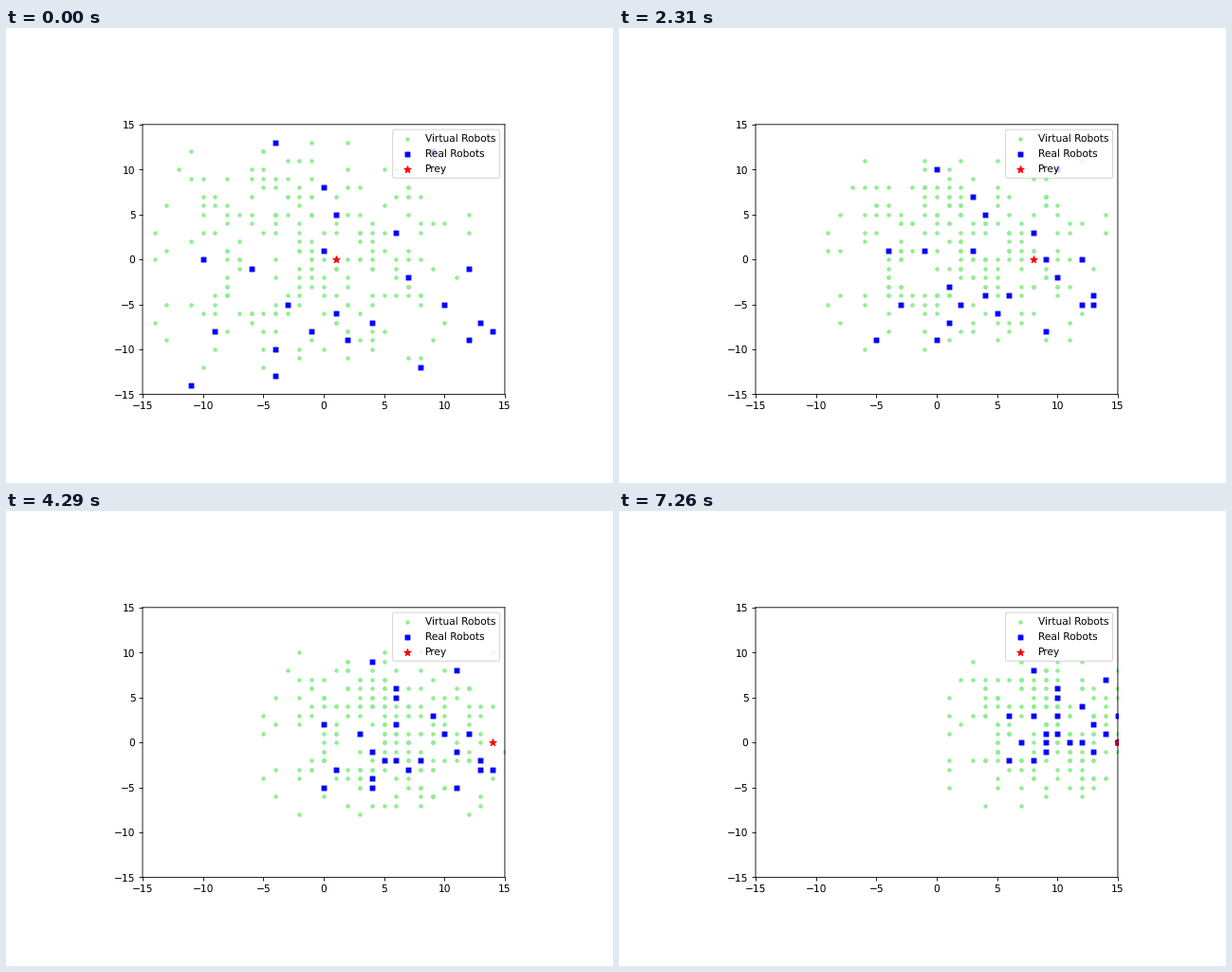
These frames come from a looping animation (640x480 px, 9250 ms). A matplotlib script:

```python
import numpy as np
import matplotlib.pyplot as plt
from matplotlib.animation import FuncAnimation

SCALE = 0.77            # the plot is drawn a little smaller than its default size
TICK_MS, STEP_MS, LOOP_MS = 50, 330, 9250
LAST = 22               # last step, held until the loop ends

plt.rcParams.update({
    "font.family": "DejaVu Sans",
    "font.size": 10 * SCALE,
    "axes.linewidth": 0.8 * SCALE,
    "patch.linewidth": SCALE,
    "lines.linewidth": 1.8 * SCALE,
    "text.hinting": "none",     # soft edges, as in a resized plot
    "path.snap": False,
})
for axis in ("xtick", "ytick"):
    for key, value in (("size", 3.5), ("width", 0.8), ("pad", 3.5)):
        plt.rcParams[f"{axis}.major.{key}"] = value * SCALE

fig = plt.figure(figsize=(6.4, 4.8), dpi=100)
ax = fig.add_axes([0.225, 0.195, 0.775 * SCALE, 0.77 * SCALE])
ax.set(xlim=(-15, 15), ylim=(-15, 15))
ax.set_xticks(range(-15, 16, 5))
ax.set_yticks(range(-15, 16, 5))


class Swarm:
    """Robots on whole cells that close in around a centre following the prey."""

    def __init__(self, starts, centers, shrink, **style):
        self.first, self.last = np.array(centers)
        self.offsets = starts - self.first
        self.shrink = np.array(shrink)
        self.dots = scatter(**style)

    def move(self, step):
        u = step / LAST
        center = self.first + (self.last - self.first) * u
        spread = self.shrink + (1 - self.shrink) * (1 - u) ** 1.5
        self.dots.set_offsets(np.rint(center + self.offsets * spread))


def scatter(color, marker, size, label):
    return ax.scatter([], [], s=size * SCALE**2, c=color, marker=marker, label=label)


def prey_at(step):
    """Run right to the wall, then dodge up and down along it."""
    return min(1 + step, 15), step % 2 if step > 14 else 0


rng = np.random.default_rng(12)
virtual = Swarm(rng.triangular((-15, -14.5), (-1, -0.5), (13.5, 14.5), (210, 2)),
                centers=[(-1, -0.3), (10, 1)], shrink=(0.7, 0.63),
                color="lightgreen", marker="o", size=10, label="Virtual Robots")
real = Swarm(rng.uniform((-12, -14), (14, 14), (24, 2)),
             centers=[(1, 0), (10.4, 3)], shrink=(0.4, 0.36),
             color="blue", marker="s", size=20, label="Real Robots")
prey = scatter(color="red", marker="*", size=50, label="Prey")
ax.legend(loc="upper right")


def update(tick):
    step = min((tick * TICK_MS + TICK_MS - 1) // STEP_MS, LAST)
    virtual.move(step)
    real.move(step)
    prey.set_offsets([prey_at(step)])
    return virtual.dots, real.dots, prey


anim = FuncAnimation(fig, update, frames=LOOP_MS // TICK_MS, interval=TICK_MS,
                     repeat=True, repeat_delay=0)
plt.show()
```
